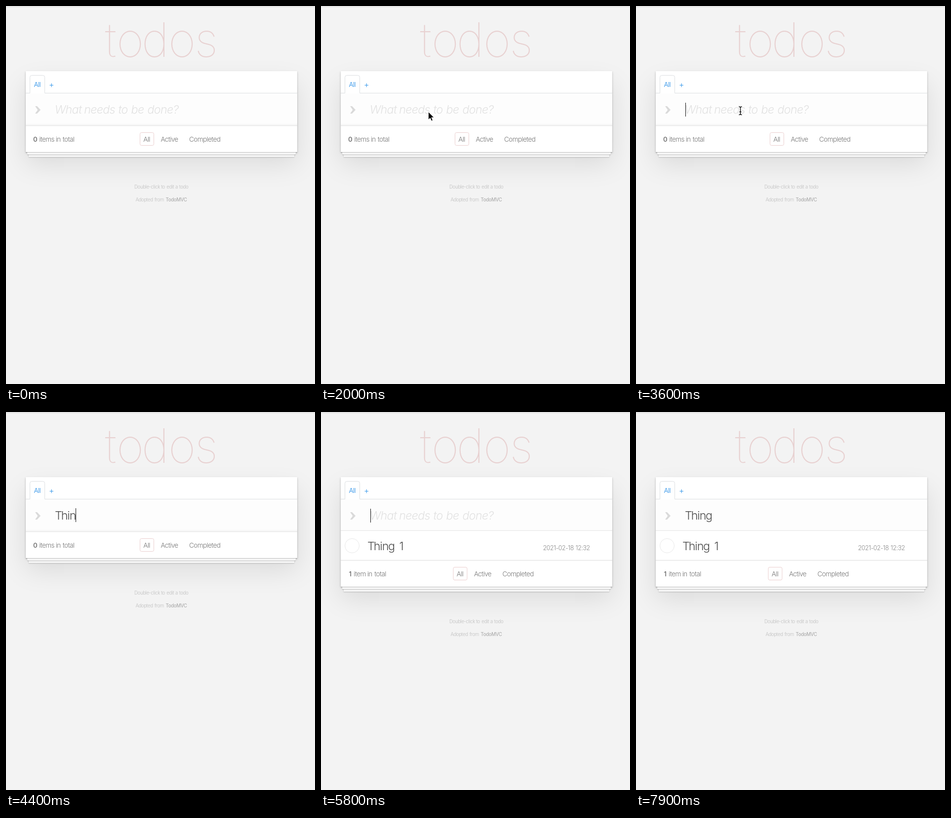
Write an HTML page that moves like this. It is 626 px wide and 766 px high and loops after 8000 ms.

```html
<!DOCTYPE html>
<html lang="en">
<head>
<meta charset="utf-8">
<title>todos</title>
<style>
html, body { margin: 0; width: 100%; height: 100%; overflow: hidden; background: #f3f3f3; }
.stage { position: relative; width: 626px; height: 766px; overflow: hidden; background: #f3f3f3; }
.rule { position: absolute; top: 1px; width: 100%; height: 1px; background: #d4d4d4; }
.card {
  position: absolute; left: 40px; top: 132px; width: 550px; height: 164px; background: #fff;
  box-shadow: 0 1px 1px rgba(0,0,0,.2), 0 8px 0 -3px #f6f6f6, 0 9px 1px -3px rgba(0,0,0,.2),
    0 16px 0 -6px #f6f6f6, 0 17px 2px -6px rgba(0,0,0,.2),
    0 2px 4px rgba(0,0,0,.2), 0 25px 50px rgba(0,0,0,.1);
}
.entry {
  position: absolute; top: 45px; width: 100%; height: 64px; background: #fdfdfd;
  box-shadow: inset 0 -2px 1px rgba(0,0,0,.03);
}
svg { position: absolute; left: 0; top: 0; }
text { font-family: Inter, Roboto, "Liberation Sans", sans-serif; font-weight: 300; text-anchor: middle; }
.title { font-size: 96px; font-weight: 100; fill: #e8d1d1; }
.big { font-size: 23.3px; fill: #4d4d4d; }
.hint { letter-spacing: -.7px; font-style: italic; fill: #e2e2e2; }
.small { font-size: 13.5px; letter-spacing: -.6px; fill: #777; }
.strong { font-weight: 500; fill: #666; }
.link { fill: #1f8ae6; }
.date { font-size: 12.5px; letter-spacing: -.5px; fill: #888; }
.info { font-size: 9.7px; letter-spacing: -.42px; fill: #bfbfbf; }
.name { font-weight: 500; fill: #b0b0b0; }
</style>
</head>
<body>
<div class="stage">
  <div class="rule"></div>
  <div class="card" id="card"><div class="entry"></div></div>
  <svg id="art" width="626" height="766" viewBox="0 0 626 766">
    <path d="M40 176.5H48.5V144.5a4 4 0 0 1 4 -4H74.5a4 4 0 0 1 4 4V176.5H590" fill="none" stroke="#dcdfe2"/>
    <path d="M49 176.5H78" stroke="#fff"/>
    <path d="M88.5 160.5H96M92.2 156.7V164.3" stroke="#3b9aea" stroke-width="1.1"/>
    <path d="M59 203H63L70 210.5L63 218H59L64.3 210.5Z" fill="#dadada"/>
    <g id="item">
      <path d="M40 240.5H590" stroke="#e8e8e8"/>
      <circle cx="63" cy="271" r="14.5" fill="none" stroke="#e8e8e8"/>
    </g>
    <g id="hint"></g>
    <text id="typed" class="big" y="218"></text>
    <rect id="caret" width="1" height="28" fill="#111"/>
    <g id="lower">
      <path d="M40 242.5H590" stroke="#dcdcdc"/>
      <g id="none"></g>
      <g id="one"></g>
    </g>
    <path id="arrow" d="M0 0V16L3.7 12.6L6.2 18.4L8.9 17.2L6.4 11.5H11.3Z" fill="#000" stroke="#fff" stroke-width=".9"/>
    <g id="beam" fill="none">
      <path id="bar" d="M-3 -8Q-.2 -8 0 -6Q.2 -8 3 -8M0 -6.5V7M-3 8.5Q-.2 8.5 0 6.5Q.2 8.5 3 8.5M-2 2.5H2" stroke="#fff" stroke-width="3"/>
      <path d="M-3 -8Q-.2 -8 0 -6Q.2 -8 3 -8M0 -6.5V7M-3 8.5Q-.2 8.5 0 6.5Q.2 8.5 3 8.5M-2 2.5H2" stroke="#000" stroke-width="1.3"/>
    </g>
  </svg>
</div>
<script>
const LOOP = 8000, STEP = 100, BLINK = 500, ADDED = 5800, ROW = 58;
const $ = id => document.getElementById(id);
const art = $('art');

function add(parent, tag, attrs, content = '') {
  const el = document.createElementNS('http://www.w3.org/2000/svg', tag);
  for (const key in attrs) el.setAttribute(key, attrs[key]);
  el.textContent = content;
  return parent.appendChild(el);
}

// Each word is centred on its own x.
function line(parent, y, cls, words, centres) {
  const text = add(parent, 'text', { y, class: cls });
  words.split(' ').forEach((word, i) => add(text, 'tspan', { x: centres[i] }, word));
}

// Caret stops between the letters of "Thing 1".
const stops = [100, 112, 124, 129, 141, 154, 161, 174];
const centres = stops.slice(1).map((x, i) => (x + stops[i] + 1) / 2);

function footer(group, count, words, xs, shift) {
  line(group, 275, 'small strong', count, [59]);
  line(group, 275, 'small', words, xs);
  add(group, 'rect', { x: 271.5 + shift, y: 256.5, width: 28, height: 26, rx: 3, fill: 'none', stroke: '#ebcfcf' });
  line(group, 275, 'small', 'All Active Completed', [285, 331, 402.7].map(x => x + shift));
}

add(art, 'text', { class: 'title', y: 103, x: '212 251.5 302.5 356.5 405.7' }, 'todos');
line(art, 164, 'small link', 'All', [63.3]);
line($('hint'), 218, 'big hint', 'What needs to be done?', [126, 189.5, 237, 266.5, 318]);
add($('item'), 'text', { class: 'big', y: 280, x: centres.map(x => x - 5).join(' ') }, 'Thing 1');
line($('item'), 280, 'date', '2021-02-18 12:32', [480.8, 530.3]);
footer($('none'), '0', 'items in total', [82.5, 105.7, 126.5], 0);
footer($('one'), '1', 'item in total', [78.5, 98.7, 120], -3.5);
line($('lower'), 370, 'info', 'Double-click to edit a todo', [286, 318, 332.8, 345.5, 360]);
line($('lower'), 396, 'info', 'Adopted from', [280, 310.3]);
line($('lower'), 396, 'info name', 'TodoMVC', [345]);

// Time of each key press and the number of letters then in the field.
const keys = [
  [2600, 0], [4000, 1], [4100, 2], [4200, 3], [4400, 4], [4500, 5], [4700, 6], [4900, 7],
  [ADDED, 0], [6600, 1], [6900, 2], [7000, 3], [7100, 4], [7200, 5]
];

const show = (el, on) => el.style.display = on ? '' : 'none';
const move = (el, x, y) => el.setAttribute('transform', `translate(${x} ${y})`);

function draw(t) {
  const key = keys.filter(k => k[0] <= t).pop();
  const n = key ? key[1] : 0;
  const added = t >= ADDED;

  $('typed').textContent = 'Thing 1'.slice(0, n);
  $('typed').setAttribute('x', centres.slice(0, Math.max(n, 1)).join(' '));
  show($('hint'), n === 0);
  show($('caret'), key && Math.floor((t - key[0]) / BLINK) % 2 === 0);
  $('caret').setAttribute('x', stops[n]);
  $('caret').setAttribute('y', n ? 195 : 196);

  $('card').style.height = (added ? 164 + ROW : 164) + 'px';
  move($('lower'), 0, added ? ROW : 0);
  show($('item'), added);
  show($('one'), added);
  show($('none'), !added);

  const left = Math.pow(1 - Math.min(1, Math.max(0, (t - 1400) / 600)), 2);
  show($('arrow'), t >= 1400 && t < 2400);
  move($('arrow'), 217.5 + 93 * left, 214.5 + 82 * left);
  show($('beam'), t >= 2400 && t < 4000);
  move($('beam'), t < 2500 ? 214.5 : 211.5, t < 2500 ? 213 : 212);
}

function tick() {
  const t = performance.now() % LOOP;
  draw(Math.floor(t / STEP) * STEP);
  requestAnimationFrame(tick);
}
tick();
</script>
</body>
</html>
```
